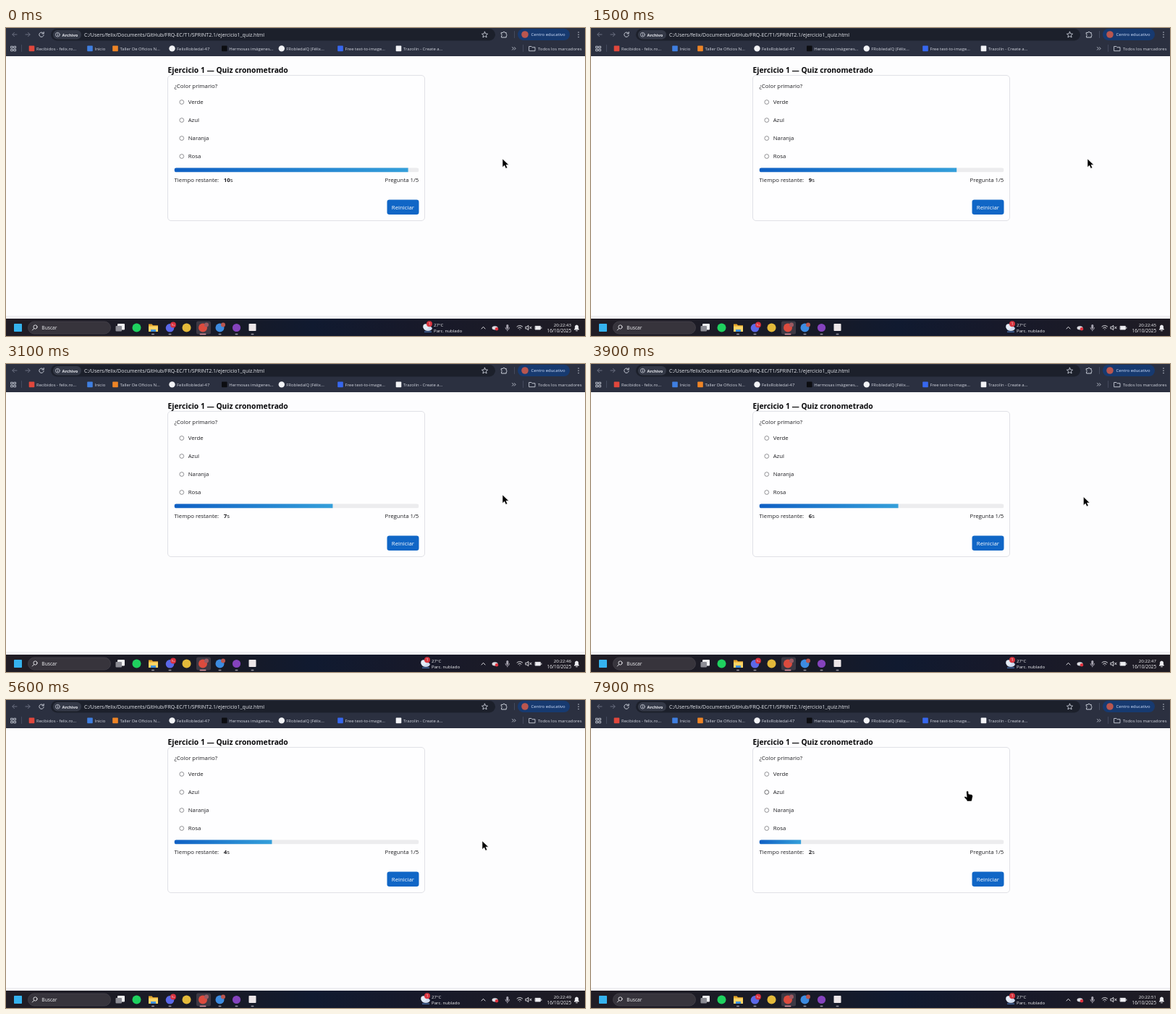
Recreate the animation shown at these times as an HTML page. Size 800 px wide and 426 px high, loop 8 s.

```html
<!DOCTYPE html>
<html lang="es">
<head>
<meta charset="utf-8">
<title>Quiz cronometrado</title>
<style>
html, body { margin: 0; width: 100%; height: 100%; overflow: hidden; background: #fdfdfe; }
svg { display: block; width: 800px; height: 426px; }
text { font: 7.8px "Open Sans", "Noto Sans", sans-serif; fill: #1c1c20; white-space: pre; }
.title { font-size: 10.3px; font-weight: 700; fill: #08080a; }
.b { font-weight: 700; }
.url { font-size: 7px; fill: #e6e8ee; }
.mark text, .chip { font-size: 5.95px; fill: #d3d6df; }
.task text { font-size: 6.1px; fill: #f2f2f5; }
.end { text-anchor: end; }
.line { fill: none; stroke: #c9cdd8; stroke-width: 1; stroke-linecap: round; stroke-linejoin: round; }
.dim { stroke: #6c7182; }
.tray { stroke: #eeeef2; stroke-width: .9; }
</style>
</head>
<body>
<svg viewBox="0 0 800 426">
  <defs>
    <linearGradient id="fill"><stop stop-color="#0f60c4"/><stop offset="1" stop-color="#349fda"/></linearGradient>
    <linearGradient id="dock">
      <stop stop-color="#211d25"/><stop offset=".4" stop-color="#171a27"/>
      <stop offset=".53" stop-color="#101a30"/><stop offset=".7" stop-color="#17192a"/>
      <stop offset="1" stop-color="#1f1c24"/>
    </linearGradient>
    <clipPath id="track"><rect x="232.5" y="193.6" width="338" height="5.6" rx="2.8"/></clipPath>
  </defs>

  <!-- browser bar -->
  <rect width="800" height="39" fill="#2b3040"/>
  <rect x="62" y="1" width="614" height="16.5" rx="8.2" fill="#1c202b"/>
  <rect x="65" y="3" width="39" height="12.5" rx="6.2" fill="#343947"/>
  <g class="line">
    <path class="dim" d="M15 9H9M11.5 6.3 8.8 9l2.7 2.7M27 9h6M30.5 6.3 33.2 9l-2.7 2.7"/>
    <path d="M51.6 7.2A3.2 3.2 0 1 0 52.2 9.8M52.2 5.5v2.4h-2.4"/>
    <circle cx="71.4" cy="9.2" r="2.9" stroke-width=".8"/>
    <path stroke-width=".9" d="M71.4 9v1.6M71.4 7.5v.1"/>
    <path stroke-width=".9" d="M661.5 5.2l1.2 2.7 2.9.3-2.2 1.9.7 2.9-2.6-1.6-2.6 1.6.7-2.9-2.2-1.9 2.9-.3z"/>
    <path d="M684.6 6.4h2.2a1.2 1.2 0 0 1 2.4 0h2v2.3a1.2 1.2 0 0 1 0 2.3v2h-6.6v-2.2a1.2 1.2 0 0 0 0-2.2z"/>
    <path stroke="#50566a" stroke-width=".7" d="M702.5 4.5v9M21.5 23.5v9M714.5 23.5v9"/>
    <path stroke-width="1.5" d="M791 6v.01M791 9.2v.01M791 12.4v.01"/>
    <path stroke-width=".9" d="M7 25.3h2.4v2.4H7zM11.2 25.3h2.4v2.4h-2.4zM7 29.4h2.4v2.4H7zM11.2 29.4h2.4v2.4h-2.4z"/>
    <path stroke-width=".9" d="M699.5 26.6l1.8 1.8-1.8 1.8M702.3 26.6l1.8 1.8-1.8 1.8"/>
    <path stroke-width=".9" d="M723 25.5h3l1 1.2h4v5h-8z"/>
  </g>
  <text class="url b" x="77.5" y="11.6" style="font-size:5.8px">Archivo</text>
  <text class="url" x="108" y="11.8">C:/Users/felix/Documents/GitHub/FRQ-EC/T1/SPRINT2.1/ejercicio1_quiz.html</text>
  <rect x="707" y="1" width="72" height="16" rx="8" fill="#173a70"/>
  <circle cx="717" cy="9" r="4.8" fill="#b9564f"/>
  <text class="chip" x="725.5" y="11.2" style="fill:#d4e3ff">Centro educativo</text>
  <g class="mark" id="marks"></g>

  <!-- quiz page -->
  <text class="title" x="223.5" y="61.6">Ejercicio 1 — Quiz cronometrado</text>
  <rect x="223.5" y="65.5" width="355" height="201" rx="4.5" fill="#fefeff" stroke="#e0e1e6"/>
  <text x="232.5" y="82.6">¿Color primario?</text>
  <g id="options"></g>
  <g clip-path="url(#track)">
    <rect x="232.5" y="193" width="338" height="7" fill="#ececee"/>
    <rect id="bar" x="232.5" y="193" height="7" fill="url(#fill)"/>
  </g>
  <text x="232.5" y="212.6">Tiempo restante:</text>
  <text x="300.8" y="212.6"><tspan class="b" id="left"></tspan>s</text>
  <text class="end" x="570.3" y="212.6">Pregunta 1/5</text>
  <rect x="526.5" y="237.5" width="44" height="20.5" rx="3.2" fill="#1066c6"/>
  <text x="548.4" y="250.7" text-anchor="middle" style="fill:#fff">Reiniciar</text>

  <!-- taskbar -->
  <rect y="398" width="800" height="4.5" fill="#f1f1f4"/>
  <rect y="402" width="800" height="24" fill="url(#dock)"/>
  <g class="task">
    <rect x="30.5" y="406" width="114" height="17" rx="8.5" fill="#37343c" stroke="#4a474f" stroke-width=".7"/>
    <g class="line tray"><circle cx="40.5" cy="413.5" r="2.6"/><path d="M38.6 415.6l-2.2 2.4"/></g>
    <text x="49.3" y="417" style="font-size:6.7px">Buscar</text>
    <rect x="263" y="405.5" width="20" height="18" rx="2.5" fill="#3d3944"/>
    <rect x="154" y="409" width="10" height="8.5" rx="1" fill="#f0f0f2"/>
    <rect x="151.5" y="412" width="8.5" height="7.5" rx="1" fill="#8d8d95"/>
    <path d="M197 409.5h4.5l1.5 1.8h7v8.7h-13z" fill="#e3a52c"/>
    <path d="M197 412.5h13v7.5h-13z" fill="#fbd467"/>
    <path d="M200 417h7v3h-7z" fill="#3f92dd"/>
    <g id="apps"></g>
    <g id="weather">
      <ellipse cx="580" cy="415.6" rx="5.8" ry="3.4" fill="#cfdcf0"/>
      <circle cx="577" cy="413" r="3.8" fill="#e5edf8"/>
      <path d="M575 420.2h10" stroke="#5b8fd8" stroke-width="1"/>
      <circle cx="582" cy="409.2" r="4" fill="#d8353f"/>
      <text x="582" y="411.2" text-anchor="middle" style="font-size:5.4px">1</text>
      <text x="588" y="412.5">27°C</text>
      <text x="588" y="421">Parc. nublado</text>
    </g>
    <g class="line tray">
      <path d="M657 416l2.5-2.7 2.5 2.7"/>
      <path d="M785.5 417h6l-.9-1.4v-2.4a2.1 2.1 0 0 0-4.2 0v2.4zM787.6 418.8h1.8" fill="#eeeef2"/>
      <path d="M706 413a5.6 5.6 0 0 1 7.6 0M707.6 415a3.3 3.3 0 0 1 4.4 0M709.8 416.9v.1"/>
      <path d="M718.3 413.2h1.4l2-1.8v6.4l-2-1.8h-1.4zM723.6 413.2l2.4 2.6M726 413.2l-2.4 2.6"/>
      <path d="M731.5 412.4h6.8v4.6h-6.8z" fill="#eeeef2"/><path d="M739.8 414v1.5"/>
      <path d="M690 414.5a2.8 2.8 0 0 0 5.6 0M692.8 417.3v1.7" stroke="#a7a4b0"/>
    </g>
    <rect x="691.3" y="410" width="3" height="6" rx="1.5" fill="#a7a4b0"/>
    <ellipse cx="675.5" cy="414.8" rx="4" ry="2.6" fill="#dcdce2"/>
    <circle cx="678" cy="416.2" r="2.2" fill="#e0323f"/>
    <text class="end" id="clock" x="781" y="412.5"></text>
    <text class="end" x="781" y="421" style="font-size:6.3px">16/10/2025</text>
  </g>

  <g id="pointer" stroke="#fff" stroke-width=".5">
    <path id="arrow" d="M0 0V11.6L2.7 9.1 4.6 13.2 6.7 12.2 4.9 8.2H8.6Z"/>
    <path id="hand" d="M-1.3 1.2Q-1.2-.4.1-.3 1.4-.2 1.5 1.2L1.8 4.1 5.6 4.7Q7.5 5.1 7.4 7L6.6 11.3 5.8 14H-.4L-1 12.3-4 9.1Q-4.6 7.7-3.3 7.4-2.2 7.3-.8 8.5Z"/>
  </g>
</svg>
<script>
const $ = id => document.getElementById(id);

const square = (x, y, s, color) =>
  `<rect x="${x - s / 2}" y="${y - s / 2}" width="${s}" height="${s}" rx=".8" fill="${color}"/>`;
const disc = (x, y, r, color) => `<circle cx="${x}" cy="${y}" r="${r}" fill="${color}"/>`;

const bookmarks = [
  [42, 'Recibidos - felix.ro...', square, '#e0473c'],
  [122.5, 'Inicio', square, '#3f7fe0'],
  [157.5, 'Taller De Oficios N...', square, '#ee8526'],
  [236, 'FelixRobledal-47', disc, '#f2f3f6'],
  [308.3, 'Hermosas imágenes...', square, '#0c0d11'],
  [387.3, 'FRobledalQ (Félix...', disc, '#f2f3f6'],
  [468.5, 'Free text-to-image...', square, '#3767ee'],
  [549, 'Trazolín - Create a...', square, '#f2f3f6'],
  [735, 'Todos los marcadores']
];
$('marks').innerHTML = bookmarks.map(([x, label, shape, color]) =>
  (shape ? shape(x - 6.5, 28.4, shape === disc ? 4.2 : 7.6, color) : '') +
  `<text x="${x}" y="30.6">${label}</text>`).join('');

$('options').innerHTML = ['Verde', 'Azul', 'Naranja', 'Rosa'].map((label, i) =>
  `<circle cx="242.8" cy="${102.5 + 25 * i}" r="2.9" fill="#fff" stroke="#77777c" stroke-width=".8"/>
   <text x="251.7" y="${105.3 + 25 * i}">${label}</text>`).join('');
const radios = $('options').querySelectorAll('circle');

const underline = (x, w = 4, color = '#9b98a3') =>
  `<rect x="${x - w / 2}" y="422.8" width="${w}" height="1.5" rx=".7" fill="${color}"/>`;
$('apps').innerHTML =
  square(16.5, 414.5, 11, '#35b2ee') + disc(180.5, 414.5, 6, '#1fd15f') +
  disc(226.5, 414.8, 5.8, '#5b68e8') + disc(231, 410.5, 3.9, '#d9303e') +
  `<text x="231" y="412.1" text-anchor="middle" style="font-size:4.3px">9+</text>` +
  disc(249.5, 414.5, 6, '#e3b93a') + disc(272, 414.5, 6, '#dc4b3e') + disc(277, 410.5, 3, '#9c5a62') +
  disc(295.5, 414.5, 6, '#3d8be0') + disc(300, 410.5, 3, '#b9564f') +
  disc(318.5, 414.5, 5.6, '#8543bd') + square(340.5, 414, 10, '#ece6e8') +
  [203, 226.5, 295.5, 318.5, 340.5].map(x => underline(x)).join('') + underline(272, 9, '#e59aa6');

// Pointer stops: time, x, y
const stops = [
  [0, 686, 181], [3700, 686, 181], [4400, 658, 195], [6000, 658, 195],
  [6400, 656, 196], [7300, 656, 196], [7900, 520, 126]
];

function pointerAt(t) {
  const i = Math.max(1, stops.findIndex(s => s[0] >= t));
  const [t0, x0, y0] = stops[i - 1], [t1, x1, y1] = stops[i];
  const p = (t - t0) / (t1 - t0), e = p * p * (3 - 2 * p);
  return [x0 + (x1 - x0) * e, y0 + (y1 - y0) * e];
}

function draw(t) {
  const width = 323.1 - .0336 * t;
  $('bar').setAttribute('width', width);
  $('left').textContent = Math.ceil(width / 33.8);
  $('clock').textContent = '20:22:' + (43 + Math.floor((t + 600) / 1000));
  $('weather').setAttribute('transform', `translate(${3 * Math.max(0, 1 - t / 500)})`);

  const [x, y] = pointerAt(t);
  const row = x < 570 ? Math.floor((y - 90) / 25) : -1;
  const hover = row >= 0 && row < 4;
  $('pointer').setAttribute('transform', `translate(${x} ${y})`);
  $('arrow').style.display = hover ? 'none' : '';
  $('hand').style.display = hover ? '' : 'none';
  radios.forEach((r, i) => r.setAttribute('stroke', i === row ? '#48484c' : '#77777c'));
}

const start = performance.now();
function tick() {
  const t = (performance.now() - start) % 8000;
  draw(Math.floor(t / 100) * 100);
  requestAnimationFrame(tick);
}
tick();
</script>
</body>
</html>
```
